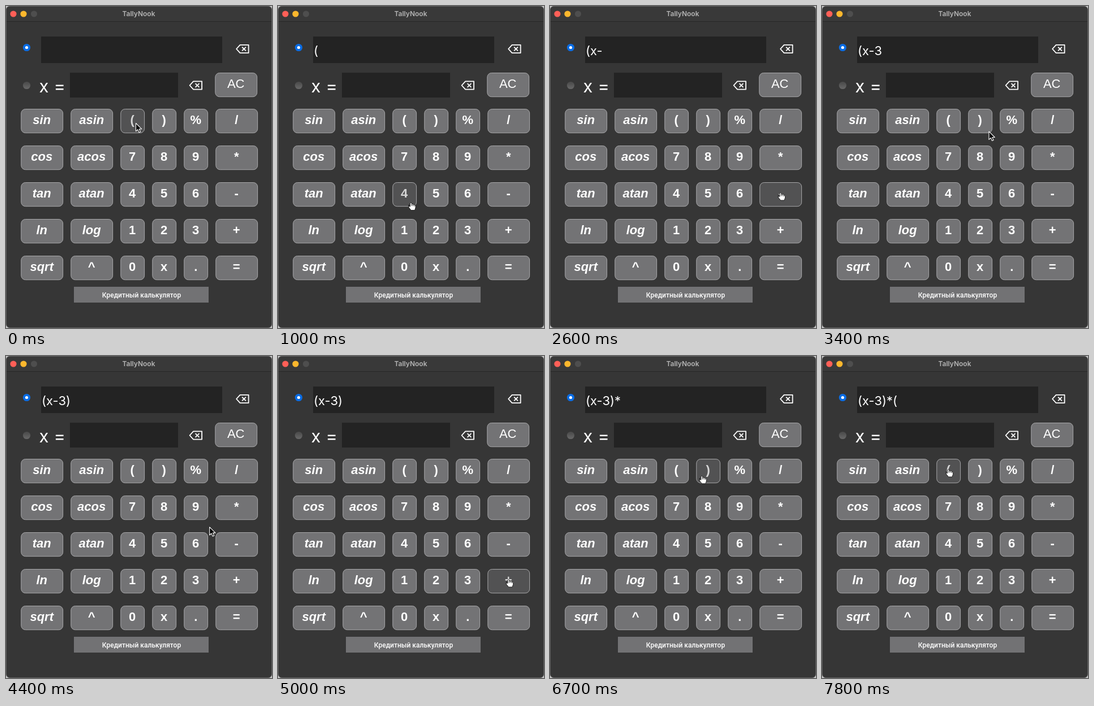
An HTML page that plays this animation: 470 by 570 pixels, repeating every 8000 ms.

```html
<!DOCTYPE html>
<html lang="ru">
<head>
<meta charset="utf-8">
<title>TallyNook</title>
<style>
  html, body { margin: 0; width: 100%; height: 100%; overflow: hidden; background: #c4c4c4; }
  svg { display: block; width: 470px; height: 570px; }
  text { fill: #fff; font-family: Inter, sans-serif; white-space: pre; }
  .key rect { fill: #737375; stroke: #a8a8aa; }
  .key text { font: bold 22px "Liberation Sans", Arial, sans-serif; text-anchor: middle; }
  .key .fn { font-style: italic; }
  .key .plain { font-weight: normal; }
  .key.hover rect { fill: #525253; }
  .key.hover text { fill: #d6d6d6; }
  .key.down rect { fill: #4a4a4b; }
  .title { font-size: 12px; font-weight: 600; fill: #b5b5b5; text-anchor: middle; }
  .link { font: 500 12px Roboto, sans-serif; text-anchor: middle; }
</style>
</head>
<body>
<svg viewBox="0 0 470 570">
  <defs>
    <linearGradient id="off" x2="0" y2="1">
      <stop offset="0" stop-color="#494949"/><stop offset="1" stop-color="#686868"/>
    </linearGradient>
    <g id="erase" fill="none" stroke="#fff" stroke-width="1.8">
      <path d="M.8 8 7.3.9H22.3V15.1H7.3Z" stroke-linejoin="round"/>
      <path d="M10.8 4.6 17.6 11.4M17.6 4.6 10.8 11.4"/>
    </g>
  </defs>

  <rect x=".5" y=".5" width="469" height="569" rx="6" fill="#363636" stroke="#606060"/>
  <path d="M1 27V7Q1 1 7 1H463Q469 1 469 7V27Z" fill="#393939"/>
  <path d="M1 27.5H469" stroke="#272727"/>
  <circle cx="13" cy="14" r="5.6" fill="#fe5f57"/>
  <circle cx="31" cy="14" r="5.6" fill="#fbb72d"/>
  <circle cx="49.500" cy="14" r="5.6" fill="#4e4e4e"/>
  <text class="title" x="234.5" y="18">TallyNook</text>

  <circle cx="36.5" cy="73.5" r="6.6" fill="#0a6ce4"/>
  <circle cx="36.5" cy="73.5" r="2.6" fill="#fff"/>
  <circle cx="36.5" cy="140.5" r="6.6" fill="url(#off)"/>
  <rect x="62" y="54" width="320" height="47" fill="#232323"/>
  <rect x="113" y="118" width="191" height="44" fill="#232323"/>
  <text id="formula" x="63" y="86.5" font-size="22"></text>
  <text x="58.5" y="153" font-size="31">x</text>
  <text x="84.5" y="153" font-size="31">=</text>
  <use href="#erase" x="406.3" y="68"/>
  <use href="#erase" x="323.8" y="132.500"/>

  <g id="keys"></g>
  <rect x="120" y="497" width="238" height="28" fill="#727274"/>
  <text class="link" x="239.5" y="516">Кредитный калькулятор</text>

  <g id="cursor" stroke-linejoin="round">
    <path id="arrow" d="M0 0V14.2L3.3 11.2 5.5 16.3 8 15.2 5.8 10.3H10.3Z" stroke="#fff" stroke-width="1.1"/>
    <g id="hand" fill="#fff" stroke="#111" stroke-width=".9">
      <path d="M-1.500 7V1Q-.2-1 1.200 1V3Q2.500 1.500 3.700 3.200 5 2.200 6 4 8 3.500 8 6V9L6.500 13.500H0L-4 8.500Q-4-.0-4 6.500-3 5.500-1.500 7Z"/>
      <path d="M1.200 3V6M3.700 3.500V6M6 4.500V6.500" fill="none"/>
    </g>
  </g>
</svg>
<script>
  const LOOP = 8000, STEP = 100, GAP = 13;
  const $ = id => document.getElementById(id);

  const rows = ["sin asin ( ) % /", "cos acos 7 8 9 *", "tan atan 4 5 6 -", "ln log 1 2 3 +", "sqrt ^ 0 x . ="];
  const keys = [{ label: "AC", x: 369, y: 118, w: 75, style: "plain" }];
  rows.forEach((row, r) => {
    let x = 26;
    row.split(" ").forEach((label, c) => {
      const w = c > 1 && c < 5 ? 43 : 75;
      keys.push({ label, x, w, y: 182 + r * 65, style: c < 2 && r + c < 5 ? "fn" : "" });
      x += w + GAP;
    });
  });

  $("keys").innerHTML = keys.map(k => `<g class="key">
    <rect x="${k.x + .8}" y="${k.y + .5}" width="${k.w - 1.2}" height="42.2" rx="7.5"/>
    <text class="${k.style}" x="${k.x + k.w / 2 - .3}" y="${k.y + 27.3}">${k.label}</text></g>`).join("");
  keys.forEach((k, i) => k.node = $("keys").children[i]);

  // Keys the pointer visits; bend shapes the sideways easing of the way there
  const stops = [
    { key: "(", at: 0, press: 600, leave: 800, dx: 6, dy: 7 },
    { key: "x", at: 1400, press: 1500, leave: 1700, bend: 2 },
    { key: "-", at: 2200, press: 2400, leave: 2600, bend: 2 },
    { key: "3", at: 2900, press: 3000, leave: 3200 },
    { key: ")", at: 3500, press: 3800, leave: 4130, bend: .8 },
    { key: "+", at: 5000, leave: 5550, bend: .4 },
    { key: "*", at: 6000, press: 6100, leave: 6300 },
    { key: "(", at: 7000, press: 7700, leave: LOOP, bend: .5 }
  ];
  for (const s of stops) {
    const k = keys.find(k => k.label === s.key);
    s.x = k.x + k.w / 2 + (s.dx || 0);
    s.y = k.y + 18.5 + (s.dy || 0);
  }

  const mix = (a, b, f) => a + (b - a) * f;

  function pointAt(t) {
    const i = stops.findIndex(s => t < s.leave);
    const to = stops[i], from = stops[i - 1];
    if (t >= to.at) return [to.x, to.y];
    const f = (t - from.leave) / (to.at - from.leave);
    return [mix(from.x, to.x, f ** (to.bend || 1)), mix(from.y, to.y, 1 - (1 - f) ** 2)];
  }

  function render(time) {
    const t = Math.floor(time % LOOP / STEP) * STEP;
    const [px, py] = pointAt(t);
    const pressed = stops.some(s => t === s.press);
    const inside = k => px > k.x + 5 && px < k.x + k.w - 5 && py > k.y + 5 && py < k.y + 38;
    const target = keys.find(inside);
    for (const k of keys) {
      const state = k !== target ? "" : pressed ? " hover down" : " hover";
      k.node.setAttribute("class", "key" + state);
    }
    const hand = target && t > 0;
    $("hand").style.display = hand ? "" : "none";
    $("arrow").style.display = hand ? "none" : "";
    $("cursor").setAttribute("transform", `translate(${px.toFixed(1)} ${py.toFixed(1)})`);
    $("formula").textContent = stops.filter(s => t > s.press).map(s => s.key).join("");
  }

  const start = performance.now();
  function tick() {
    render(performance.now() - start);
    requestAnimationFrame(tick);
  }
  tick();
</script>
</body>
</html>
```
